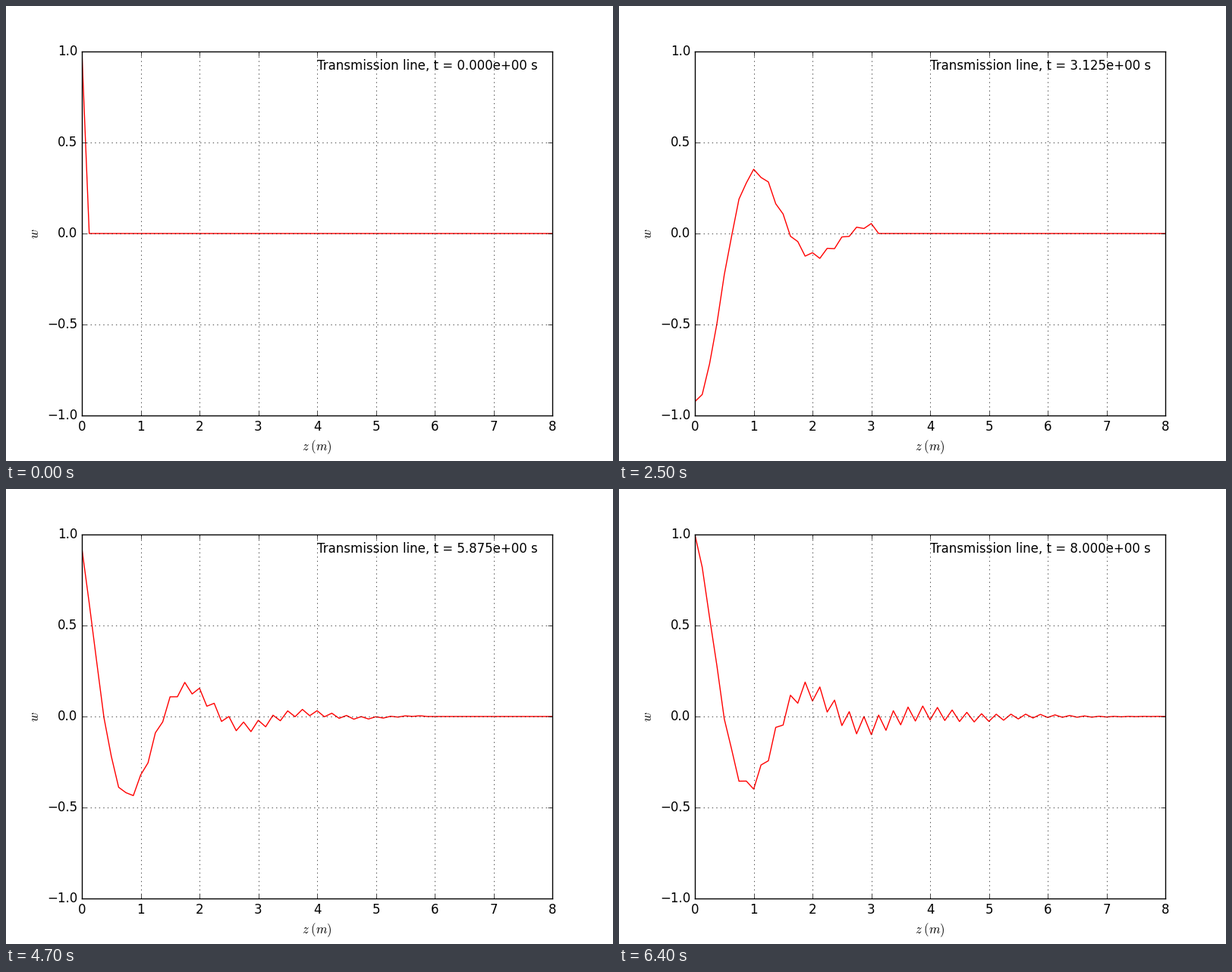
A matplotlib script that plays this animation: 800 by 600 pixels, repeating every 6500 ms.

```python
import numpy as np
import matplotlib.pyplot as plt
from matplotlib.animation import FuncAnimation

plt.style.use("classic")
plt.rcParams.update({
    "font.family": "DejaVu Sans",
    "figure.facecolor": "white",
    "figure.dpi": 100,
    "savefig.dpi": 100,
})

LENGTH = 8.0
CELLS = 64
STEPS = 64
DT = LENGTH / CELLS  # unit wave speed, Courant number 1
LOSS_R = 1.0
LOSS_G = 1.0


def solve():
    """Leapfrog solution of w_tt + (R+G) w_t + R G w = w_zz, driven at z = 0."""
    damp = (LOSS_R + LOSS_G) * DT / 2
    decay = LOSS_R * LOSS_G * DT ** 2
    w = np.zeros((STEPS + 1, CELLS + 1))
    w[:, 0] = np.cos(np.pi * DT * np.arange(STEPS + 1))
    for n in range(1, STEPS):
        now, before = w[n], w[n - 1]
        w[n + 1, 1:-1] = (now[2:] + now[:-2] - (1 - damp) * before[1:-1]
                          - decay * now[1:-1]) / (1 + damp)
    return w


z = np.linspace(0, LENGTH, CELLS + 1)
wave = solve()

fig, ax = plt.subplots(figsize=(8, 6), dpi=100)
ax.set_xlim(0, LENGTH)
ax.set_ylim(-1, 1)
ax.set_yticks(np.arange(-1, 1.1, 0.5))
ax.set_xlabel(r"$z\;(m)$")
ax.set_ylabel(r"$w$")
ax.grid(True)
line, = ax.plot(z, wave[0], "r-", lw=1)
label = ax.text(4, 0.9, "")


def draw(n):
    line.set_ydata(wave[n])
    label.set_text(f"Transmission line, t = {n * DT:.3e} s")
    return line, label


anim = FuncAnimation(fig, draw, frames=STEPS + 1, interval=100,
                     repeat=True, repeat_delay=0)
plt.show()
```
